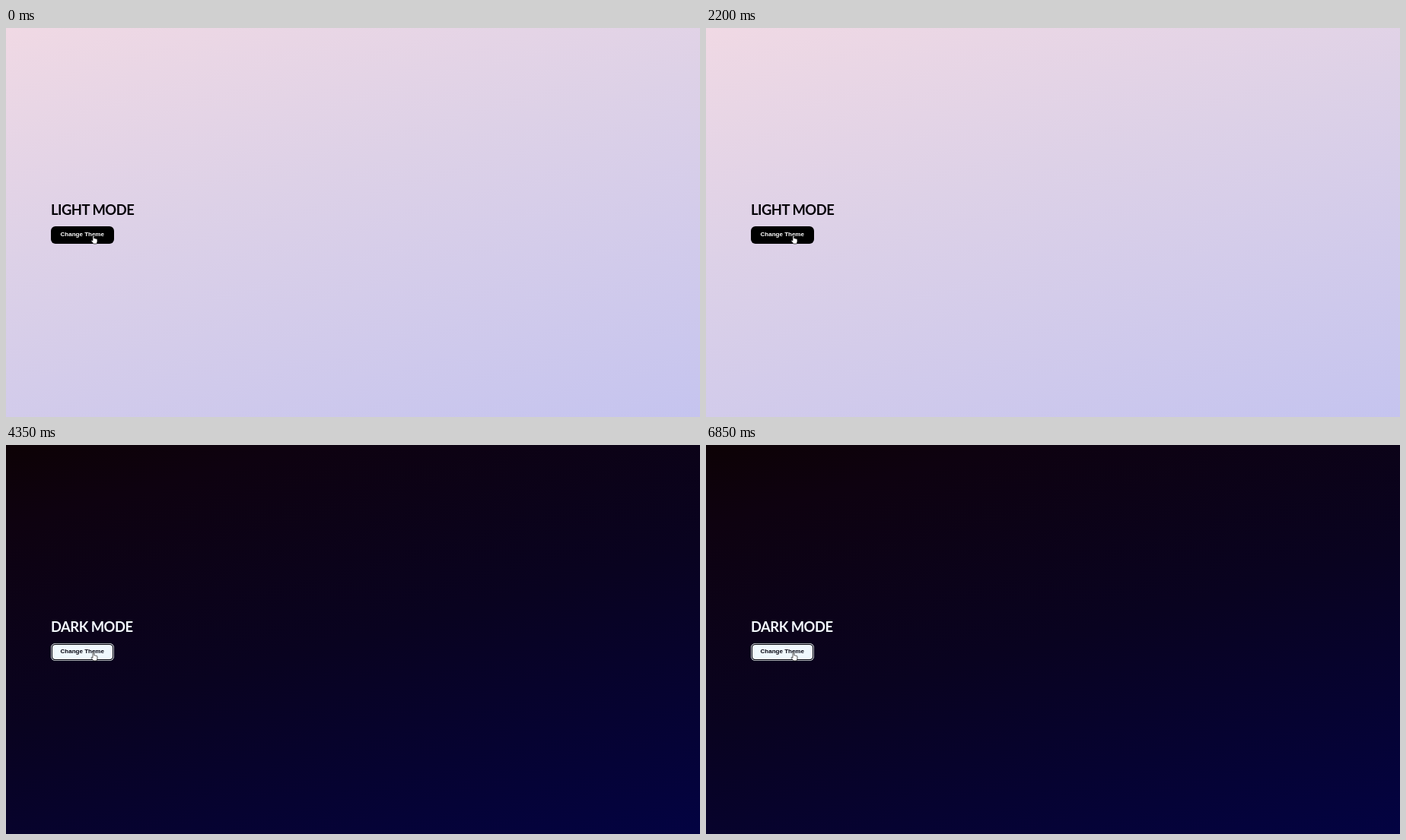
An HTML page for the animation above (6.9 s loop, 912 px wide and 512 px high).

```html
<!DOCTYPE html>
<html lang="en">
<head>
<meta charset="utf-8">
<title>Theme switch</title>
<style>
  html, body { margin: 0; width: 100%; height: 100%; overflow: hidden; }
  .theme { position: absolute; left: 0; top: 0; width: 912px; height: 512px; overflow: hidden; }
  .light {
    --ink: #050308; --fill: #000; --label: #fff; --ring: none;
    background: linear-gradient(165deg, #f0d9e4, #ddd1e7 40%, #c5c4ef);
  }
  .dark {
    --ink: #f4fafe; --fill: #f0f8fd; --label: #050510;
    --ring: inset 0 0 0 .8px #e8eef4, inset 0 0 0 2px #05030c;
    background: linear-gradient(165deg, #0d0205, #0e0210 14%, #090320 50%, #030342);
    animation: toggle 6900ms step-end infinite;
  }
  h1 {
    position: absolute; left: 59px; top: 227px; margin: 0;
    font: bold 18.4px/24px "Trebuchet MS", Lato, sans-serif;
    letter-spacing: -.5px; white-space: nowrap; color: var(--ink);
  }
  .button {
    position: absolute; left: 59px; top: 261px; width: 82.5px; height: 23px;
    border-radius: 6px; background: var(--fill); box-shadow: var(--ring);
    font: bold 8px/22px "Liberation Sans", Arial, sans-serif;
    text-align: center; color: var(--label);
  }
  .hand { position: absolute; left: 111px; top: 272px; }
  /* Clicks at 200, 1100, 2300, 3250, 4300, 5450 and 6450 ms */
  @keyframes toggle {
    0%, 15.942%, 47.101%, 78.986% { opacity: 0; }
    2.899%, 33.333%, 62.319%, 93.478%, 100% { opacity: 1; }
  }
</style>
</head>
<body>
  <div class="theme light">
    <h1>LIGHT MODE</h1>
    <div class="button">Change Theme</div>
  </div>
  <div class="theme dark">
    <h1>DARK MODE</h1>
    <div class="button">Change Theme</div>
  </div>
  <svg class="hand" width="11" height="14" viewBox="0 0 11 14">
    <path d="M3 8V2Q3 1 3.9 1T4.8 2V5Q5.6 4.5 6.2 5.2Q7 4.8 7.5 5.6Q9 5.2 9 6.7V9.3L8.2 12H4L1.2 8.6Q.8 7.4 1.8 7.3Z"
      fill="#fff" stroke="#111" stroke-width=".7" stroke-linejoin="round"/>
  </svg>
</body>
</html>
```
